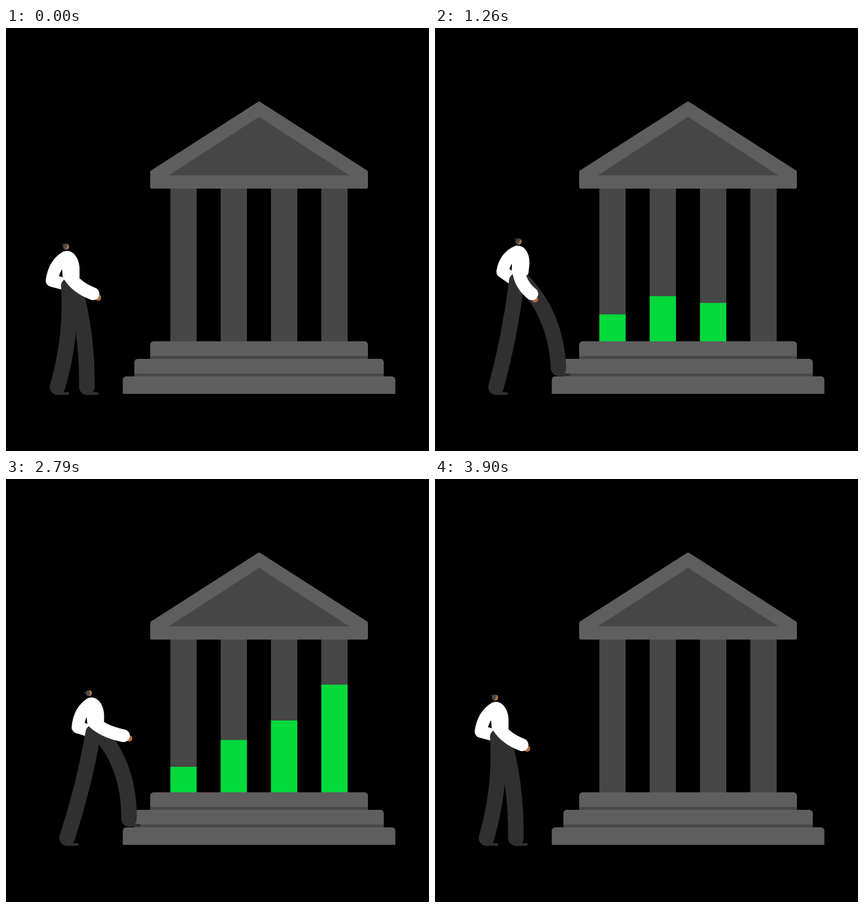
An HTML page with a canvas for the animation above (4.5 s loop, 748 by 748 pixels).

```html
<!DOCTYPE html>
<html lang="en">
<head>
<meta charset="utf-8">
<title>Walking to the columns</title>
<style>
html, body { margin: 0; height: 100%; overflow: hidden; background: #000; }
canvas { display: block; }
</style>
</head>
<body>
<canvas id="stage" width="748" height="748"></canvas>
<script>
const g = document.getElementById('stage').getContext('2d');
const LOOP = 4500, STEP = 30, REST = 3900;
const STONE = '#5e5e5e', SHADE = '#474747', GREEN = '#02d93a';
const TROUSERS = '#303030', SKIN = '#b5703f', HAIR = '#4b4b4d';

const bars = [
  { height: 45, start: 980, rise: 390, over: .13 },
  { height: 92.5, start: 1070, rise: 390, over: .13 },
  { height: 127, start: 1160, rise: 390, over: .13 },
  { height: 191.5, start: 1330, rise: 1320, over: 0 }
];

const mix = (a, b, k) => a + (b - a) * k;
const progress = (t, from, to) => Math.min(1, Math.max(0, (t - from) / (to - from)));
const ease = (t, from, to) => {
  const p = progress(t, from, to);
  return p * p * (3 - 2 * p);
};
// Goes from 0 to 1 between a and b, and back to 0 between c and d.
const pulse = (t, a, b, c, d) => ease(t, a, b) * (1 - ease(t, c, d));

function rect(x, y, w, h, color) {
  g.fillStyle = color;
  g.fillRect(x, y, w, h);
}

function disc(x, y, r, color) {
  g.fillStyle = color;
  g.beginPath();
  g.arc(x, y, r, 0, 7);
  g.fill();
}

function limb(path, width, color) {
  g.strokeStyle = color;
  g.lineWidth = width;
  g.stroke(new Path2D(path));
}

function barHeight({ height, start, rise, over }, fallStart, t) {
  const top = start + rise;
  const grown = 1 - (1 - progress(t, start, top)) ** 2.5;
  const bounce = 1 + over * pulse(t, start, top, top, top + 180);
  const q = progress(t, fallStart, fallStart + 345) ** .75;
  const left = q < .5 ? 1 - 4 * q ** 3 : 4 * (1 - q) ** 3;
  return height * grown * bounce * left;
}

function building(t) {
  bars.forEach((bar, i) => {
    const x = 290.6 + 89 * i, h = barHeight(bar, 3260 - 163 * i, t);
    rect(x, 283, 46.5, 271, SHADE);
    rect(x, 554 - h, 46.5, h, GREEN);
  });
  const roof = new Path2D('M258 281V254.6L447.5 133L637 254.6V281Z');
  g.fillStyle = g.strokeStyle = STONE;
  g.lineWidth = 6;
  g.fill(roof);
  g.stroke(roof);
  g.fillStyle = SHADE;
  g.fill(new Path2D('M288 260.5L447.5 157L607 260.5Z'));
  [385, 441, 482].forEach((w, i) => {
    const x = 447.5 - w / 2, y = 554 + 31 * i;
    g.fillStyle = STONE;
    g.beginPath();
    g.roundRect(x, y, w, 31, [6, 6, 0, 0]);
    g.fill();
    if (i < 2) rect(x, y + 26, w, 5, SHADE);
  });
}

function leg([hx, hy], x, y, bendX, bendY) {
  const kx = (hx + x) / 2 + bendX, ky = (hy + y) / 2 + bendY;
  limb(`M${x} ${y + 11.3}h18.5`, 4.8, TROUSERS);
  limb(`M${hx} ${hy}Q${kx} ${ky} ${x} ${y}`, 27.5, TROUSERS);
}

function man(t) {
  // Each part steps in and returns on its own schedule.
  const walk = pulse(t, 300, 1500, 2650, REST);
  const push = pulse(t, 450, 990, 990, 1750);
  const step = pulse(t, 500, 1300, 2741, 3315);
  const slide = pulse(t, 550, 1000, 3240, 3800);
  const elbow = pulse(t, 900, 1550, 2150, 3250);
  const reach = pulse(t, 950, 1800, 2600, REST);
  const raise = pulse(t, 1100, 2000, 2600, REST);
  const gaze = pulse(t, 1500, 2050, 3050, REST);
  const swing = Math.sin(Math.PI * step);

  const sx = mix(108, 153, walk);
  const sy = 394 - 7.7 * Math.sin(walk * Math.PI / 2) - 2 * push;
  const lean = .15 * push;
  const cos = Math.cos(lean), sin = Math.sin(lean);
  const body = (x, y) => [sx + x * cos - y * sin, sy + x * sin + y * cos];

  // Back arm, hand resting behind the waist
  const [ax, ay] = body(-2, 11);
  const bx = sx + mix(-27, -20.5, elbow) - 8 * push, by = sy + 52.7 - 9.7 * push;
  limb(`M${ax} ${ay}Q${(ax + bx) / 2 - 8.5} ${(ay + by) / 2 - 8} ${bx} ${by}L${body(-7, 58)}`, 21.7, '#fff');

  leg(body(3, 62), mix(91, 108, slide), 635, mix(16, 7, slide), 0);
  leg(body(11, 59), mix(143, 219, step), mix(635, 602, step) - 24 * swing,
    mix(13, 28, step) + 14 * swing, mix(-8, -17, step) + 3 * swing);

  // Torso
  g.save();
  g.translate(sx, sy);
  g.rotate(lean);
  g.fillStyle = '#fff';
  g.fill(new Path2D('M0 0C10 0 21 11 22 30V46Q22 50 17 52L-1 53Q-7 50 -8 44L-9 30C-14 17 -14 3 0 0Z'));
  g.restore();

  // Front arm
  const [cx, cy] = body(4, 44);
  const wx = mix(154, 211, reach), wy = mix(470, 453, raise) + 2 * push;
  const span = Math.hypot(wx - cx, wy - cy);
  disc(wx + 11.3 * (wx - cx) / span, wy + 11.3 * (wy - cy) / span, 5.5, SKIN);
  limb(`M${body(2, 13)}L${cx} ${cy}Q${(cx + wx) / 2 - 8} ${(cy + wy) / 2 + 5} ${wx} ${wy}`, 22.5, '#fff');

  // Head
  const turn = mix(.35, -.03, gaze) + .25 * push;
  g.save();
  g.translate(sx - 4.7 + 8 * turn, sy - 7.5);
  g.rotate(turn);
  disc(0, 0, 5.5, HAIR);
  g.fillStyle = SKIN;
  g.beginPath();
  g.arc(0, 0, 5.5, -1.3, 1.3);
  g.fill();
  rect(-8, -2.3, 2.4, 1.8, HAIR);
  g.restore();
}

function draw(now) {
  const t = Math.min(REST, Math.floor(now % LOOP / STEP) * STEP);
  rect(0, 0, 748, 748, '#000');
  building(t);
  man(t);
}

g.lineCap = g.lineJoin = 'round';
const start = performance.now();
function tick() {
  draw(performance.now() - start);
  requestAnimationFrame(tick);
}
tick();
</script>
</body>
</html>
```
